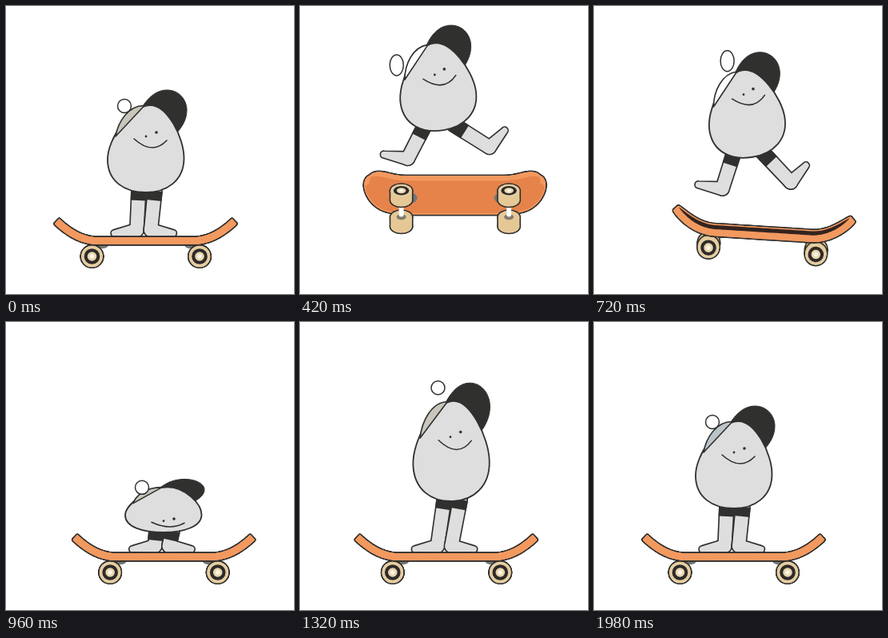
These frames come from a looping animation (360x360 px, 2.04 s). An HTML page with a canvas:

```html
<!DOCTYPE html>
<html lang="en">
<head>
<meta charset="utf-8">
<title>Skating egg</title>
<style>
  html, body { margin: 0; width: 100%; height: 100%; overflow: hidden; background: #fff; }
  canvas { display: block; width: 360px; height: 360px; }
</style>
</head>
<body>
<canvas id="stage"></canvas>
<script>
const canvas = document.getElementById('stage');
const ctx = canvas.getContext('2d');
const ratio = window.devicePixelRatio || 1;
canvas.width = canvas.height = 360 * ratio;

const STEP = 60, STEPS = 34;
const INK = '#30302f', SKIN = '#dedede', TAN = '#e5c896';
const EDGE = '#f2995f', UNDERSIDE = '#e6834b', DECK = '#33231f';

const rad = degrees => degrees * Math.PI / 180;
const mix = (a, b, k) => a + (b - a) * k;

function ease(from, to, n) {
  const k = Math.min(1, Math.max(0, (n - from) / (to - from)));
  return k * k * (3 - 2 * k);
}

// --- Motion: every rule takes the step number n ---

const airborne = n => ease(4, 6.8, n) * (1 - ease(12, 14.5, n));

// Crouch, landing, then a damped bounce; negative is flattened.
function squash(n) {
  if (n < 5) return -.33 * Math.sin(Math.PI * n / 5);
  if (n < 16) return -.48 * ease(13, 16, n);
  const fade = Math.max(0, 1 - (n - 16) / 10) ** 1.3;
  return -.48 * fade * Math.cos(Math.PI * (n - 16) / 6);
}

function bodyY(n) {
  const fromPeak = n - 8.3;
  const flight = 151 + (fromPeak < 0 ? -2.1 * fromPeak ** 3 : 2.8 * fromPeak ** 2);
  return Math.min(233 - 62.5 * squash(n), flight);
}

const headY = n => bodyY(n) - 108 * (1 + squash(n));
const bodyX = n => 175 + 22 * ease(5.5, 13, n) * (1 - ease(18, 28, n)) - 4.5 * airborne(n);

function boardPose(n) {
  const roll = rad(360 * ease(5.2, 12.6, n));
  return {
    x: 174.5 + boardShift(n),
    y: Math.min(293.5, 228 + 4.3 * (n - 8.4) ** 2),
    tilt: rad(3.6 * ease(9, 12, n) * (1 - ease(12, 14.5, n))),
    sin: Math.sin(roll),
    cos: Math.cos(roll)
  };
}

function boardShift(n) {
  return n < 11 ? 41 * Math.max(0, (n - 3.5) / 7.5) : 41 * ((33 - n) / 22) ** 2.3;
}

// --- Drawing helpers ---

function fill(path, color) {
  ctx.fillStyle = color;
  ctx.fill(path);
}

function stroke(path, width = 1.8, color = INK) {
  ctx.lineWidth = width;
  ctx.strokeStyle = color;
  ctx.stroke(path);
}

// Outlines several paths as one shape, optionally padded with rounded corners.
function joined(paths, color, pad = 0) {
  paths.forEach(path => stroke(path, 3.3 + pad));
  paths.forEach(path => {
    fill(path, color);
    if (pad) stroke(path, pad, color);
  });
}

function ellipse(x, y, rx, ry = rx) {
  const path = new Path2D();
  path.ellipse(x, y, rx, ry, 0, 0, 2 * Math.PI);
  return path;
}

function polygon(points) {
  const path = new Path2D();
  points.forEach(([x, y]) => path.lineTo(x, y));
  path.closePath();
  return path;
}

function line(from, to) {
  const path = new Path2D();
  path.moveTo(...from);
  path.lineTo(...to);
  return path;
}

// Tapered capsule between two circles.
function limb([ax, ay], ra, [bx, by], rb) {
  const path = new Path2D(), angle = Math.atan2(by - ay, bx - ax), q = Math.PI / 2;
  path.arc(ax, ay, ra, angle + q, angle + 3 * q);
  path.arc(bx, by, rb, angle - q, angle + q);
  path.closePath();
  return path;
}

// --- Character ---

const EGG = 'M5-109C27-109 47.5-68 47.5-43C47.5-14 25 0 0 0C-27 0-48-14-48-41C-48-68-18-109 5-109Z';
const BRIM = 'M-4-108C4-120 14-128 26-128C42-128 51-115 51-103C51-91 45-82 39-75L15-85Z';
const CROWN = 'M-38-70C-35-88-22-109-2-108.5Z';
const SMILE = 'M-15-67Q8-46 26-65';

// Ankle and toe offset per leg: in the kick from the body, standing from the board.
const LEFT = { stand: [-11, 280], kick: [-38, 35], fall: [-31, 39], toe: [-28, 4], kickToe: [-30, -5] };
const RIGHT = { stand: [6.5, 280], kick: [64, 21], fall: [54.5, 31], toe: [28, 4], kickToe: [19, -21] };

function drawLeg(leg, side, n, x, y, air, kick) {
  const hip = [x + 1 + side * (10 + 7 * air), y - 2 - 6 * air];
  const ground = [174.5 + boardShift(n) + leg.stand[0], leg.stand[1]];
  const ankle = [x, y].map((base, i) =>
    mix(ground[i], base + mix(leg.fall[i], leg.kick[i], kick), air));
  const toe = ankle.map((v, i) => v + mix(leg.toe[i], leg.kickToe[i], air));
  const length = Math.hypot(ankle[0] - hip[0], ankle[1] - hip[1]);
  const cuffAt = Math.min(1, (12 + 6 * air) / length);
  const cuff = hip.map((v, i) => mix(v, ankle[i], cuffAt));
  joined([limb(hip, 8.3, ankle, 8), limb(ankle, 8, toe, 3.6)], SKIN);
  ctx.lineCap = 'butt';
  stroke(line(hip, cuff), 19.5);
  ctx.lineCap = 'round';
}

function drawCharacter(n) {
  const x = bodyX(n), y = bodyY(n), air = airborne(n), bounce = squash(n);
  const kick = 1 - ease(7, 12, n);
  const stretch = 1 + bounce, reach = Math.max(0, bounce);
  const middle = 43 * stretch;
  const faceDrop = 46 * Math.max(0, -bounce) - 9 * (1 - kick) * air;
  const matrix = new DOMMatrix().translate(x, y - middle)
    .rotate(-9.5 * air - 16 * reach).translate(0, middle).scale(1, stretch);
  const place = data => {
    const path = new Path2D();
    path.addPath(new Path2D(data), matrix);
    return path;
  };
  const locate = (px, py) => matrix.transformPoint({ x: px, y: py });

  drawLeg(LEFT, -1, n, x, y, air, kick);
  drawLeg(RIGHT, 1, n, x, y, air, kick);

  const brim = place(BRIM), egg = place(EGG), crown = place(CROWN);
  fill(brim, INK);
  stroke(brim, 1);
  fill(egg, SKIN);
  stroke(egg);
  fill(crown, air > .5 ? '#fff' : `hsl(${50 + 150 * ease(22, 33, n)} 11% 76%)`);
  stroke(crown, 1.6);

  ctx.save();
  ctx.translate(0, faceDrop);
  stroke(place(SMILE), 1.6);
  const leftEye = locate(0, -70), rightEye = locate(13, -75);
  fill(ellipse(leftEye.x, leftEye.y, 1.4), INK);
  fill(ellipse(rightEye.x, rightEye.y, 1.8), INK);
  ctx.restore();

  // The bobble trails behind the head.
  const swing = air * (headY(n - 1) - headY(n)) - 130 * reach;
  const anchor = locate(-27, -108);
  const bobble = ellipse(anchor.x - .7 * swing, anchor.y + swing, 8.5, 8.5 + 4.5 * air);
  if (air < .5) fill(bobble, '#fff');
  stroke(bobble, 1.5);
}

// --- Skateboard, rolled around its long axis ---

function drawWheels(sin, cos) {
  const height = -19.5 - 11 * Math.max(0, sin);
  const project = depth => -(height * cos + depth * sin);
  const flat = Math.max(.08, Math.abs(cos));
  const front = cos >= 0 ? 1 : -1;
  for (const x of [-67, 67.5]) {
    const disc = (y, r) => ellipse(x, y, r, r * flat);
    for (const side of [-front, front]) {
      const outer = project(28 * side), inner = project(13 * side);
      const barrel = polygon([[x - 13.3, outer], [x + 13.3, outer], [x + 13.3, inner], [x - 13.3, inner]]);
      joined([disc(outer, 13.3), disc(inner, 13.3), barrel], TAN);
      if (side === front) {
        fill(disc(outer, 13), '#e5cda3');
        fill(disc(outer, 9.8), '#2d2a28');
        fill(disc(outer, 5.8), '#e8d5ae');
        fill(disc(outer, 2.8), '#fbf6e8');
      } else {
        fill(disc(inner, 6), '#827b6c');
        if (sin > .2) stroke(line([x, project(9 * side)], [x, project(3 * front)]), 6, '#fff');
      }
    }
  }
}

// Point on the deck: position along it, near or far side, upper or lower face.
function deckPoint(x, side, face, sin, cos) {
  const bend = Math.max(0, Math.abs(x) - 60);
  const slope = Math.atan(47 * bend / 2500) * Math.sign(x);
  const corner = Math.max(0, Math.abs(x) - 82) / 28;
  const depth = side * 26 * Math.sqrt(Math.max(0, 1 - corner ** 2.5));
  const height = 23.5 * (bend / 50) ** 2 + face * 3 * Math.cos(slope);
  return [x - face * 3 * Math.sin(slope), -(height * cos + depth * sin)];
}

function drawDeck(sin, cos) {
  const rim = (side, face) => Array.from({ length: 61 }, (_, i) =>
    deckPoint(110 * Math.sin(rad(i * 3 - 90)), side, face, sin, cos));
  const band = (a, b) => polygon([...a, ...b.reverse()]);
  const wall = side => band(rim(side, 1), rim(side, -1));
  const surface = face => band(rim(1, face), rim(-1, face));
  const front = cos >= 0 ? 1 : -1;
  joined([wall(-front), wall(front), surface(1), surface(-1)], EDGE, 2.8);
  if (Math.abs(sin) > .01) fill(surface(sin > 0 ? -1 : 1), sin > 0 ? UNDERSIDE : DECK);
  fill(wall(front), EDGE);
  stroke(wall(front), 2, EDGE);
}

function drawBoard({ x, y, tilt, sin, cos }) {
  const drawGear = () => {
    for (const truck of [-55, 57]) {
      fill(ellipse(truck, 6 * cos, 8, 3.8 + 3.2 * Math.abs(sin)), '#747875');
    }
    drawWheels(sin, cos);
  };
  ctx.save();
  ctx.translate(x, y);
  ctx.rotate(tilt);
  if (sin <= 0) drawGear();
  drawDeck(sin, cos);
  if (sin > 0) drawGear();
  ctx.restore();
}

function draw(time) {
  const n = Math.floor(time / STEP) % STEPS;
  ctx.setTransform(ratio, 0, 0, ratio, 0, 0);
  ctx.lineJoin = ctx.lineCap = 'round';
  ctx.fillStyle = '#fff';
  ctx.fillRect(0, 0, 360, 360);
  drawCharacter(n);
  drawBoard(boardPose(n));
}

const start = performance.now();
function tick() {
  draw(performance.now() - start);
  requestAnimationFrame(tick);
}
tick();
</script>
</body>
</html>
```
